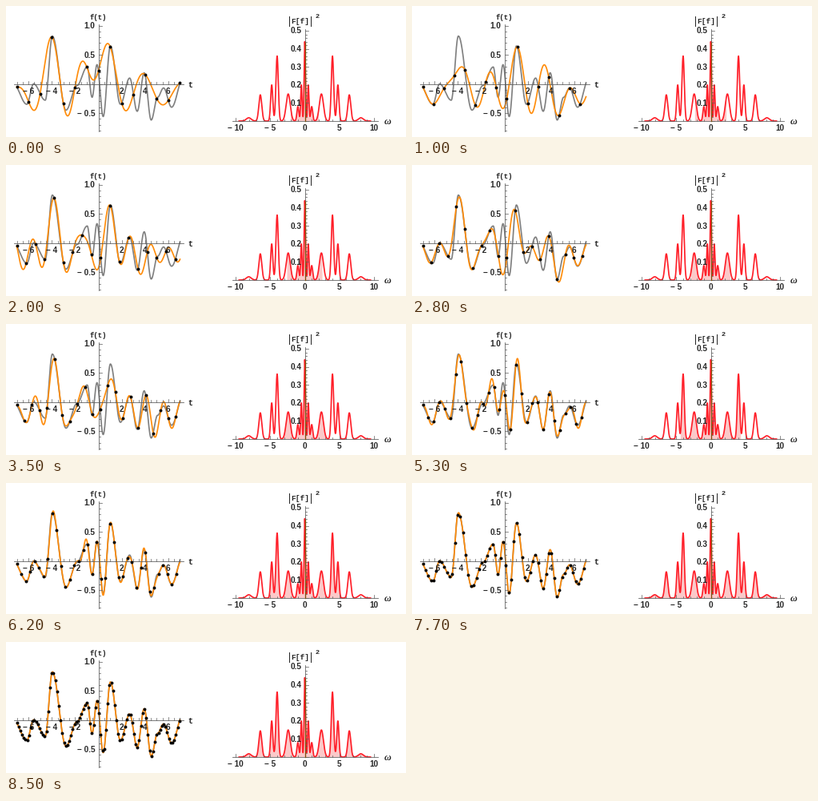
Recreate the animation shown at these times as a matplotlib script. Size 500 by 164 pixels, loop 10000 ms.

```python
import numpy as np
import matplotlib.pyplot as plt
from matplotlib.animation import FuncAnimation

WIDTH, HEIGHT, DPI = 500, 164, 100
PX = 72 / DPI
FRAMES, LAST_STEP = 100, 85
GRAY, ORANGE, RED, PINK = "#808080", "#ff8c0a", "#ff1e28", "#fbc9c9"
AXIS, INK = "#5c5c5c", "#262626"

# Plot coordinates to stage pixels.
T0, T_UNIT, F0, F_UNIT = 115, 14.57, 97, 73
W0, W_UNIT, P0, P_UNIT = 373, 8.65, 143.5, 226

# Turning points (t, f) of the signal, joined by half cosines.
TURNS = [
    (-7.3, 0), (-6.14, -.35), (-5.56, 0), (-4.56, -.28), (-3.95, .82),
    (-2.78, -.45), (-1.85, -.03), (-.96, .29), (-.54, -.23), (-.12, .33),
    (.41, -.56), (1.03, .65), (1.89, -.35), (2.68, .1), (3.33, -.47),
    (3.93, .19), (4.53, -.62), (5.08, -.23), (5.59, -.07), (6.28, -.4),
    (7.3, .12),
]
# Spectral lines: centre, height, width.
PEAKS = [
    (0, .44, .14), (.5, .2, .14), (1, .08, .2), (2.4, .15, .42),
    (4, .36, .24), (4.78, .2, .22), (6.43, .145, .3), (8.1, .018, .5),
]


def signal(t):
    turn_t, turn_f = np.array(TURNS).T
    position = np.interp(t, turn_t, np.arange(len(TURNS)))
    i = np.minimum(position.astype(int), len(TURNS) - 2)
    ease = (1 - np.cos(np.pi * (position - i))) / 2
    return turn_f[i] + (turn_f[i + 1] - turn_f[i]) * ease


def spectrum(w):
    return sum(height * np.exp(-((np.abs(w) - centre) / width) ** 2)
               for centre, height, width in PEAKS)


def sample(step):
    spacing = 1 - 0.01 * step
    times = -7 + spacing * np.arange(int(14 / spacing + 1e-6) + 1)
    return spacing, times, signal(times)


fig = plt.figure(figsize=(WIDTH / DPI, HEIGHT / DPI), dpi=DPI, facecolor="white")
ax = fig.add_axes([0, 0, 1, 1])
ax.set(xlim=(-0.5, WIDTH - 0.5), ylim=(HEIGHT - 0.5, -0.5))
ax.axis("off")


def line(x, y, color, width, z):
    return ax.plot(x, y, color=color, lw=width * PX, zorder=z,
                   solid_joinstyle="round")[0]


def label(x, y, text, size=10, family="Liberation Sans", ha="center", **style):
    ax.text(x, y, text, fontsize=size * PX, family=family, ha=ha, weight="bold",
            va="center_baseline", color=INK, zorder=5, **style)


def x_axis(x0, x1, y, origin, unit, minor, major, limit):
    line([x0, x1], [y, y], AXIS, 0.8, 4)
    steps = round(limit / minor)
    for k in range(-steps, steps + 1):
        x = origin + k * minor * unit
        size = 2.4 if k % round(major / minor) else 4
        line([x, x], [y, y - size], AXIS, 0.7, 4)


def y_axis(y0, y1, x, origin, unit, minor, major, low, high):
    line([x, x], [y0, y1], AXIS, 0.8, 4)
    for k in range(round(low / minor), round(high / minor) + 1):
        y = origin - k * minor * unit
        size = 2.4 if k % round(major / minor) else 4
        line([x, x + size], [y, y], AXIS, 0.7, 4)


def signed(value, pattern="{}"):
    text = pattern.format(abs(value))
    return "\u2212 " + text if value < 0 else text


# Time plot
x_axis(9, 221, F0, T0, T_UNIT, 0.5, 2, 7)
y_axis(22, 156, T0, F0, F_UNIT, 0.1, 0.5, -0.8, 1)
for v in (-6, -4, -2, 2, 4, 6):
    label(T0 + T_UNIT * v, F0 + 8.5, signed(v))
for v in (-0.5, 0.5, 1.0):
    label(T0 - 4, F0 - F_UNIT * v, signed(v, "{:.1f}"), ha="right")
label(114.5, 13, "f(t)", 9, "Liberation Mono")
label(229.5, 97.5, "t", 10, "Liberation Mono")

# Spectrum plot
x_axis(282, 464, P0, W0, W_UNIT, 1, 5, 10)
y_axis(28, P0, W0, P0, P_UNIT, 0.02, 0.1, 0, 0.5)
for v in range(-10, 11, 5):
    label(W0 + W_UNIT * v - 0.5, 151, signed(v))
for v in np.arange(1, 6) / 10:
    label(W0 - 4, P0 - P_UNIT * v - 0.5, f"{v:.1f}", ha="right")
label(367, 18, "F[f]", 9.5, "Liberation Mono")
for x in (353.5, 380.5):
    line([x, x], [12.5, 24], INK, 1, 5)
label(389, 12, "2", 8.5, "Liberation Mono")
label(476.5, 143.5, "\u03c9", 12, "Liberation Serif", style="italic")

t = np.linspace(-7, 7, 900)
t_px = T0 + T_UNIT * t
line(t_px, F0 - F_UNIT * signal(t), GRAY, 1.7, 2)
rebuilt = line([], [], ORANGE, 1.7, 3)
dots, = ax.plot([], [], "o", color="black", ms=3.9 * PX, mew=0, zorder=6)

w = np.linspace(-9.5, 9.5, 1313)
w_px, power_px = W0 + W_UNIT * w, P0 - P_UNIT * spectrum(w)
line(w_px, power_px, RED, 1.7, 3)
line([W0, W0], [45, P0], "#80500a", 1.3, 4.5)
band, = ax.fill([0, 0, 0], [0, 0, 0], color=PINK, lw=0, zorder=1)


def draw(frame):
    spacing, times, values = sample(min(frame, LAST_STEP))
    wave = np.sinc((t[:, None] - times) / spacing) @ values
    rebuilt.set_data(t_px, F0 - F_UNIT * wave)
    dots.set_data(T0 + T_UNIT * times, F0 - F_UNIT * values)

    inside = np.abs(w) <= 2.05 / spacing
    x, y = w_px[inside], power_px[inside]
    band.set_xy(np.column_stack([np.r_[x, x[-1], x[0]], np.r_[y, P0, P0]]))
    return rebuilt, dots, band


anim = FuncAnimation(fig, draw, frames=FRAMES, interval=100, repeat=True,
                     repeat_delay=0, blit=False)
plt.show()
```
